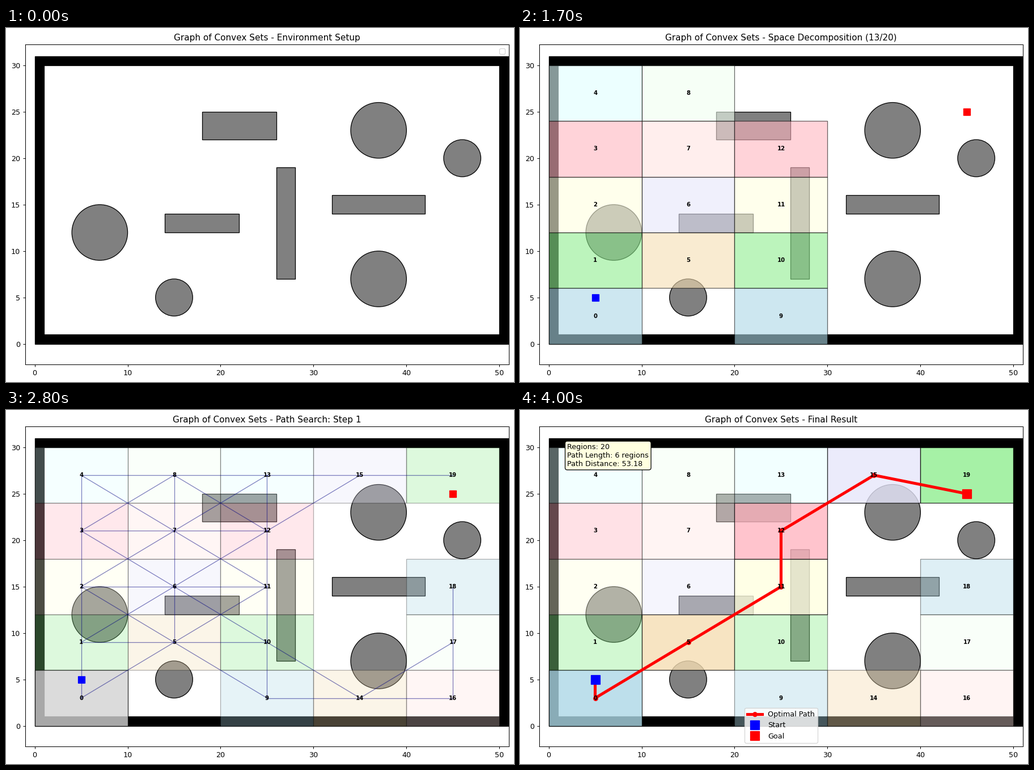
A matplotlib script for the animation above (4.5 s loop, 896 by 625 pixels).

```python
import math

import matplotlib.pyplot as plt
from matplotlib.animation import FuncAnimation
from matplotlib.patches import Circle, Rectangle

W, H, DPI = 896, 625, 91.67
LEFT, TOP, AX_W, AX_H = 34.2, 29.5, 852.5, 564.7

WALLS = [(0, 0, 1, 30), (0, 30, 50, 1), (1, 0, 50, 1), (50, 1, 1, 30)]
BOXES = [(14, 12, 8, 2), (18, 22, 8, 3), (26, 7, 2, 12), (32, 14, 10, 2)]
DISCS = [(7, 12, 3), (46, 20, 2), (15, 5, 2), (37, 7, 3), (37, 23, 3)]
START, GOAL = (5, 5), (45, 25)

CELL_W, CELL_H = 10, 6
BLOCKED = {(1, 0), (3, 1), (3, 2), (3, 3), (4, 3)}
CELLS = [(c, r) for c in range(5) for r in range(5) if (c, r) not in BLOCKED]
CENTERS = [((c + 0.5) * CELL_W, (r + 0.5) * CELL_H) for c, r in CELLS]
COLORS = ["lightblue", "lightgreen", "lightyellow", "lightpink", "lightcyan",
          "wheat", "lavender", "mistyrose", "honeydew"]
N = len(CELLS)


def touching(i, j):
    (a, b), (c, d) = CELLS[i], CELLS[j]
    return max(abs(a - c), abs(b - d)) == 1


EDGES = [(i, j) for i in range(N) for j in range(i + 1, N) if touching(i, j)]


def a_star(first, last):
    """Return the order in which cells are expanded and the best path."""
    cost, parent = {first: 0}, {}
    frontier, order = {first}, []
    while frontier:
        cur = min(frontier, key=lambda n: (
            cost[n] + math.dist(CENTERS[n], CENTERS[last]), n))
        frontier.remove(cur)
        order.append(cur)
        if cur == last:
            break
        for n in range(N):
            if n in order or not touching(cur, n):
                continue
            new = cost[cur] + math.dist(CENTERS[cur], CENTERS[n])
            if new < cost.get(n, math.inf):
                cost[n], parent[n] = new, cur
                frontier.add(n)
    path = [last]
    while path[-1] != first:
        path.append(parent[path[-1]])
    return order, path[::-1]


ORDER, PATH = a_star(0, N - 1)
ROUTE = [START] + [CENTERS[i] for i in PATH[:-1]] + [GOAL]
LENGTH = sum(math.dist(p, q) for p, q in zip(ROUTE, ROUTE[1:]))

fig = plt.figure(figsize=((W + 1e-6) / DPI, (H + 1e-6) / DPI), dpi=DPI,
                 facecolor="white")
ax = fig.add_axes([LEFT / W, 1 - (TOP + AX_H) / H, AX_W / W, AX_H / H])
HALF_Y = 26 * AX_H / AX_W


def draw_world(title):
    ax.clear()
    ax.set_xlim(-1, 51)
    ax.set_ylim(15 - HALF_Y, 15 + HALF_Y)
    ax.set_xticks(range(0, 51, 10))
    ax.set_yticks(range(0, 31, 5))
    ax.set_title("Graph of Convex Sets - " + title)
    for x, y, w, h in WALLS:
        ax.add_patch(Rectangle((x, y), w, h, fc="black", ec="black"))
    for x, y, w, h in BOXES:
        ax.add_patch(Rectangle((x, y), w, h, fc="gray", ec="black"))
    for x, y, r in DISCS:
        ax.add_patch(Circle((x, y), r, fc="gray", ec="black"))


def draw_start(size=10):
    ax.plot(*START, "bs", ms=size, label="Start")


def draw_goal(size=10):
    ax.plot(*GOAL, "rs", ms=size, label="Goal")


def draw_cells(alpha, count=N, visited=(), strong=()):
    for i, (c, r) in enumerate(CELLS[:count]):
        color = "lightgray" if i in visited else COLORS[i % len(COLORS)]
        a = 0.8 if i in visited or i in strong else alpha
        ax.add_patch(Rectangle((c * CELL_W, r * CELL_H), CELL_W, CELL_H,
                               fc=color, ec="black", alpha=a))
        ax.text(*CENTERS[i], str(i), ha="center", va="center",
                fontsize=8, fontweight="bold")


def draw_edges():
    for i, j in EDGES:
        ax.plot(*zip(CENTERS[i], CENTERS[j]), color="navy", alpha=0.5, lw=1)


def draw_route():
    ax.plot(*zip(*ROUTE), "ro-", lw=4, ms=6, label="Optimal Path")


def setup(k):
    draw_world("Environment Setup")
    if k == 0:
        ax.legend([], [], loc="upper right")
        return
    draw_start()
    if k > 1:
        draw_goal()
    ax.legend(loc="lower left" if k == 1 else "lower right")


def decompose(count):
    draw_world(f"Space Decomposition ({count}/{N})")
    draw_cells(0.6, count)
    draw_start()
    draw_goal()


def construct(k):
    stages = ["Adjacency Detection", "Edge Creation", "Graph Complete"]
    draw_world("Graph Construction: " + stages[k])
    draw_cells(0.4)
    if k:
        draw_edges()
    draw_start()
    draw_goal()


def search(step):
    draw_world(f"Path Search: Step {step}")
    draw_cells(0.3, visited=ORDER[:step])
    draw_edges()
    draw_start()
    draw_goal()


def solve(k):
    titles = ["Path Found", "Path Reconstruction", "Optimal Path",
              "Final Result"]
    k = min(k, 3)
    draw_world(titles[k])
    draw_cells(0.4, strong=PATH)
    if k:
        draw_route()
    size = 12 if k > 1 else 10
    draw_start(size)
    draw_goal(size)
    if k == 3:
        info = (f"Regions: {N}\nPath Length: {len(PATH)} regions\n"
                f"Path Distance: {LENGTH:.2f}")
        ax.text(2, 30.43, info, fontsize=10, va="top",
                bbox=dict(boxstyle="round", fc="lightyellow", ec="black"))
        ax.legend(loc="lower center")


def update(frame):
    if frame < 5:
        setup(min(frame, 2))
    elif frame < 25:
        decompose(frame - 4)
    elif frame < 28:
        construct(frame - 25)
    elif frame < 28 + len(ORDER):
        search(frame - 27)
    else:
        solve(frame - 28 - len(ORDER))
    return []


anim = FuncAnimation(fig, update, frames=45, interval=100, repeat=True,
                     repeat_delay=0, blit=False)
plt.show()
```
